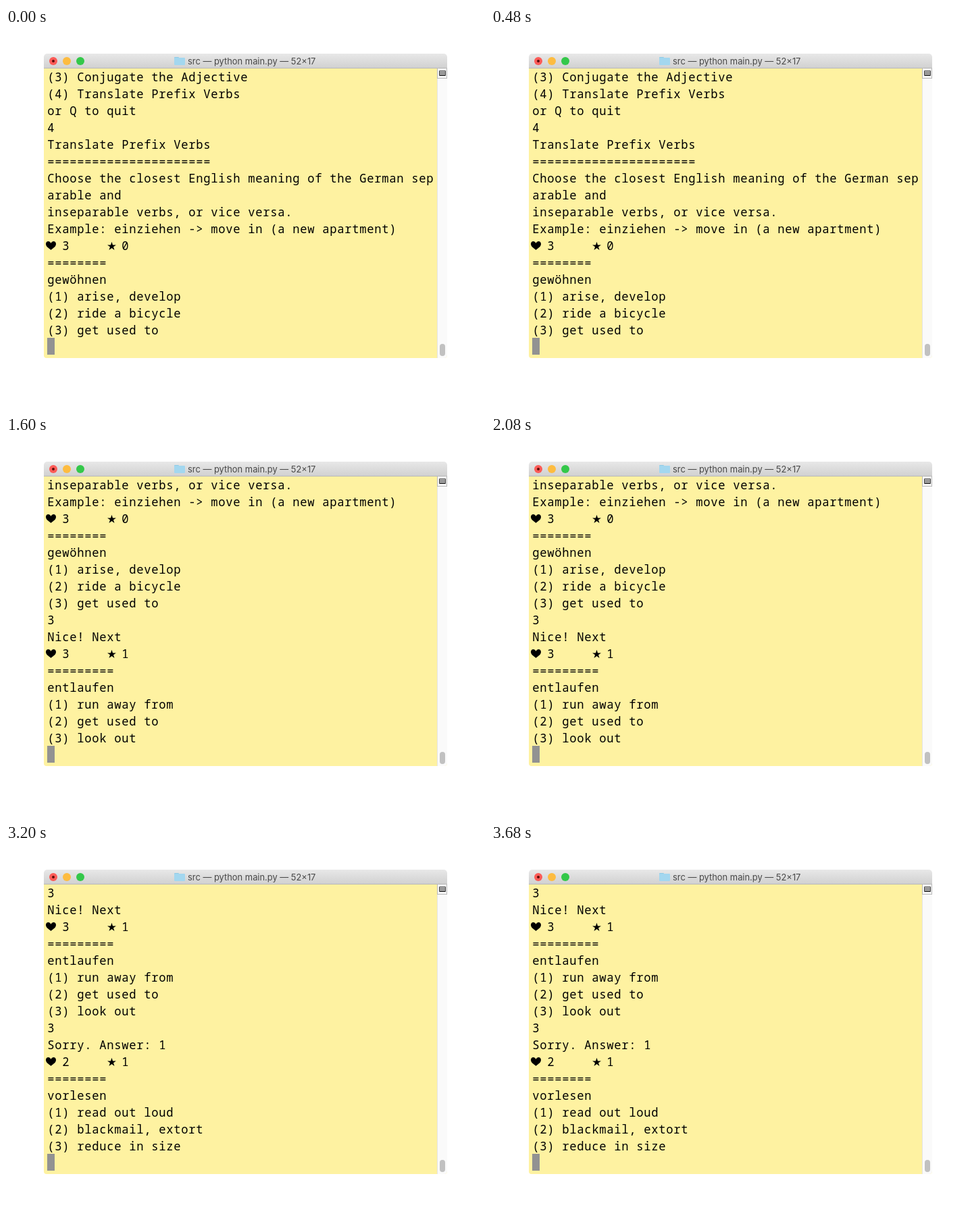
These frames come from a looping animation (709 px wide and 563 px high, 4000 ms). An HTML page with a canvas:

```html
<!DOCTYPE html>
<html lang="en">
<meta charset="utf-8">
<title>Verb quiz</title>
<style>
  html, body { margin: 0; width: 100%; height: 100%; overflow: hidden; background: #fff; }
  canvas { display: block; }
</style>
<canvas width="709" height="563"></canvas>
<script>
const ctx = document.querySelector('canvas').getContext('2d');
const LEFT = 61, TOP = 59, CELL = 11, LINE = 25, ROWS = 17, STEP = 800;
const MONO = '500 17.2px "Noto Sans Mono", monospace';

const log = `(3) Conjugate the Adjective
(4) Translate Prefix Verbs
or Q to quit
4
Translate Prefix Verbs
======================
Choose the closest English meaning of the German sep
arable and
inseparable verbs, or vice versa.
Example: einziehen -> move in (a new apartment)
♥ 3     ★ 0
========
gewöhnen
(1) arise, develop
(2) ride a bicycle
(3) get used to
3
Nice! Next
♥ 3     ★ 1
=========
entlaufen
(1) run away from
(2) get used to
(3) look out
3
Sorry. Answer: 1
♥ 2     ★ 1
========
vorlesen
(1) read out loud
(2) blackmail, extort
(3) reduce in size`.split('\n');

// Each state: number of finished lines, then what is typed on the prompt line.
const states = [[16, ''], [16, '3'], [24, ''], [24, '3'], [32, '']];

ctx.font = MONO;
const tracking = CELL - ctx.measureText('0').width;

function rect(x, y, w, h, color, radius = 0) {
  ctx.fillStyle = color;
  ctx.beginPath();
  ctx.roundRect(x, y, w, h, radius);
  ctx.fill();
}

function dot(x, y, r, color) {
  rect(x - r, y - r, 2 * r, 2 * r, color, r);
}

function text(string, x, y, font, color, spacing = 0) {
  ctx.font = font;
  ctx.fillStyle = color;
  ctx.letterSpacing = `${spacing}px`;
  ctx.fillText(string, x, y);
}

function heart(x, y) {
  ctx.beginPath();
  ctx.moveTo(x, y + 6.5);
  ctx.bezierCurveTo(x - 2, y + 4, x - 7.5, y + 2, x - 7.5, y - 2.5);
  ctx.bezierCurveTo(x - 7.5, y - 7.5, x - 1.5, y - 7.5, x, y - 3.5);
  ctx.bezierCurveTo(x + 1.5, y - 7.5, x + 7.5, y - 7.5, x + 7.5, y - 2.5);
  ctx.bezierCurveTo(x + 7.5, y + 2, x + 2, y + 4, x, y + 6.5);
  ctx.fill();
}

function star(x, y) {
  ctx.beginPath();
  for (let i = 0; i < 10; i++) {
    const r = i % 2 ? 2.6 : 6.8, a = i * Math.PI / 5;
    ctx.lineTo(x + r * Math.sin(a), y - r * Math.cos(a));
  }
  ctx.fill();
}

function drawTitleBar() {
  const shade = ctx.createLinearGradient(0, 38, 0, 60);
  shade.addColorStop(0, '#e8e8e8');
  shade.addColorStop(1, '#d0d0d0');
  rect(56, 38, 597, 22, shade, [5, 5, 0, 0]);
  rect(56, 59, 597, 1, '#b8b8b8');
  ['#fc5b57', '#fdbc40', '#34c84a'].forEach((color, i) => dot(70 + 20 * i, 49, 6, color));
  dot(70, 49, 2, '#5a0c0a');

  rect(249, 43, 7, 4, '#8fcbe6', 1);
  rect(249, 44, 16, 11, '#a3d7ef', 1);
  text('src — python main.py — 52×17', 269, 54, '12.9px Inter, sans-serif', '#484848');
}

function drawScrollBar() {
  rect(638, 60, 15, 429, '#fafafa', [0, 0, 4, 0]);
  rect(638, 60, 1, 429, '#e4e4e4');
  rect(638, 60, 15, 15, '#b8b8b8');
  rect(639, 60, 13, 14, '#f6f6f6');
  rect(641, 63, 10, 8, '#444', 1);
  for (let y = 64; y < 70; y += 2) rect(642, y, 8, 1, '#eee');
  rect(642, 468, 8, 18, '#c1c1c1', 4);
}

function drawLine(line, top) {
  text(line.replace(/[♥★]/g, ' '), LEFT + tracking / 2, top + 20, MONO, '#000', tracking);
  if (line[0] === '♥') {
    heart(LEFT + 5.5, top + 13.5);
    star(LEFT + 95.5, top + 14.5);
  }
}

function draw(now) {
  const [count, typed] = states[Math.floor(now / STEP) % states.length];
  ctx.clearRect(0, 0, 709, 563);
  rect(56, 59, 597, 430, '#fef2a1', [0, 0, 4, 4]);
  drawTitleBar();
  drawScrollBar();
  const promptTop = TOP + (ROWS - 1) * LINE;
  rect(LEFT + typed.length * CELL, promptTop, CELL, LINE, '#929292');
  log.slice(count - ROWS + 1, count).concat(typed)
    .forEach((line, row) => drawLine(line, TOP + row * LINE));
  requestAnimationFrame(() => draw(performance.now()));
}

draw(performance.now());
</script>
</html>
```
